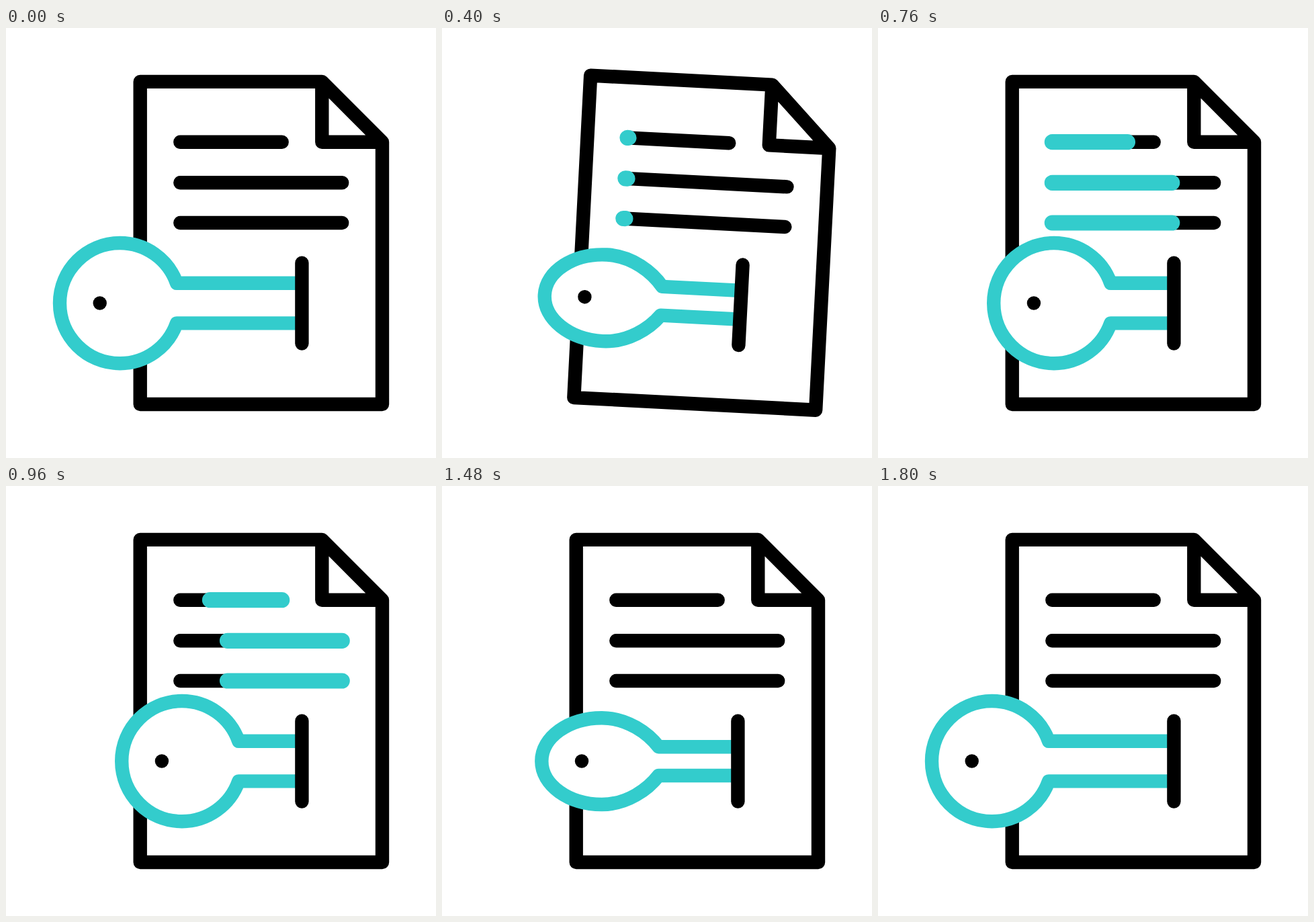
Recreate the animation shown at these times as an HTML page. Size 640 by 640 pixels, loop 2 s.

```html
<!DOCTYPE html>
<html lang="en">
<head>
<meta charset="utf-8">
<title>Key and document</title>
<style>
  html, body { margin: 0; width: 100%; height: 100%; overflow: hidden; background: #fff; }
  svg { display: block; width: 100%; height: 100%; }
  .ink, .teal { fill: none; stroke-width: 20.4; stroke-linecap: round; stroke-linejoin: round; }
  .ink { stroke: #000; }
  .teal { stroke: #3cc; }
  .mark { stroke-width: 23.2; }
  #key { fill: #fff; stroke-linecap: butt; }
</style>
</head>
<body>
<svg viewBox="0 0 640 640">
  <g id="sheet">
    <path class="ink" d="M199.7 79.9H470.3L560 169.8V560H199.7ZM470.3 79.9V169.8H560"/>
    <path class="ink" d="M259.3 169.7H410.7M259.3 230.3H500.2M259.3 290H500.2"/>
    <path class="teal mark" id="marks"/>
    <path class="teal" id="key"/>
    <path class="ink" d="M440.4 349.7V469.5"/>
    <circle id="hole" cy="409.5" r="10.2"/>
  </g>
</svg>
<script>
const LOOP = 2000, STEP = 40;
const AXIS = 409.6, RADIUS = 89.6, SLIDE = 92.2;
const LINES = [[169.7, 410.7], [230.3, 500.2], [290, 500.2]];
const LINE_START = 259.3;
const [sheet, marks, key, hole] =
  ['sheet', 'marks', 'key', 'hole'].map(id => document.getElementById(id));

const progress = (t, from, to) => Math.min(1, Math.max(0, (t - from) / (to - from)));
const ease = x => x * x * (3 - 2 * x);
const bump = x => ease(1 - Math.abs(2 * x - 1));

// Upper half runs from shaft to left edge; the lower half mirrors it.
function keyPath(shift, squash) {
  const cx = 169.6 + shift, scale = 1 - 0.38 * squash;
  const top = RADIUS * scale, neck = 29.8 * scale;
  const neckX = cx + 84.4, k = 0.5523;
  const half = [
    [437, neck], [neckX, neck],
    [neckX - 12.6 - 3.6 * squash, neck + 35.8 - 21.3 * squash],
    [cx + 38, top], [cx, top],
    [cx - RADIUS * k, top], [cx - RADIUS, top * k], [cx - RADIUS, 0]
  ];
  const upper = half.map(([x, y]) => [x, AXIS - y]);
  const lower = half.map(([x, y]) => [x, AXIS + y]).reverse().slice(1);
  const p = [...upper, ...lower].map(point => point.join(' '));
  return `M${p[0]}L${p[1]}C${p.slice(2, 14).join(' ')}L${p[14]}`;
}

function draw(t) {
  const push = progress(t, 80, 560), pull = progress(t, 1320, 1800);
  const shift = SLIDE * (ease(push) - ease(pull));
  sheet.setAttribute('transform', `rotate(${4 * bump(push)} 390 490)`);
  key.setAttribute('d', keyPath(shift, bump(push) + bump(pull)));
  hole.setAttribute('cx', 139.7 + shift);

  const head = ease(progress(t, 360, 960)), tail = ease(progress(t, 760, 1320));
  marks.setAttribute('d', head > tail ? LINES.map(([y, end]) => {
    const at = f => LINE_START + (end - LINE_START) * f;
    return `M${at(tail)} ${y}H${at(head)}`;
  }).join('') : '');
}

function tick() {
  draw(Math.floor(performance.now() % LOOP / STEP) * STEP);
  requestAnimationFrame(tick);
}
tick();
</script>
</body>
</html>
```
